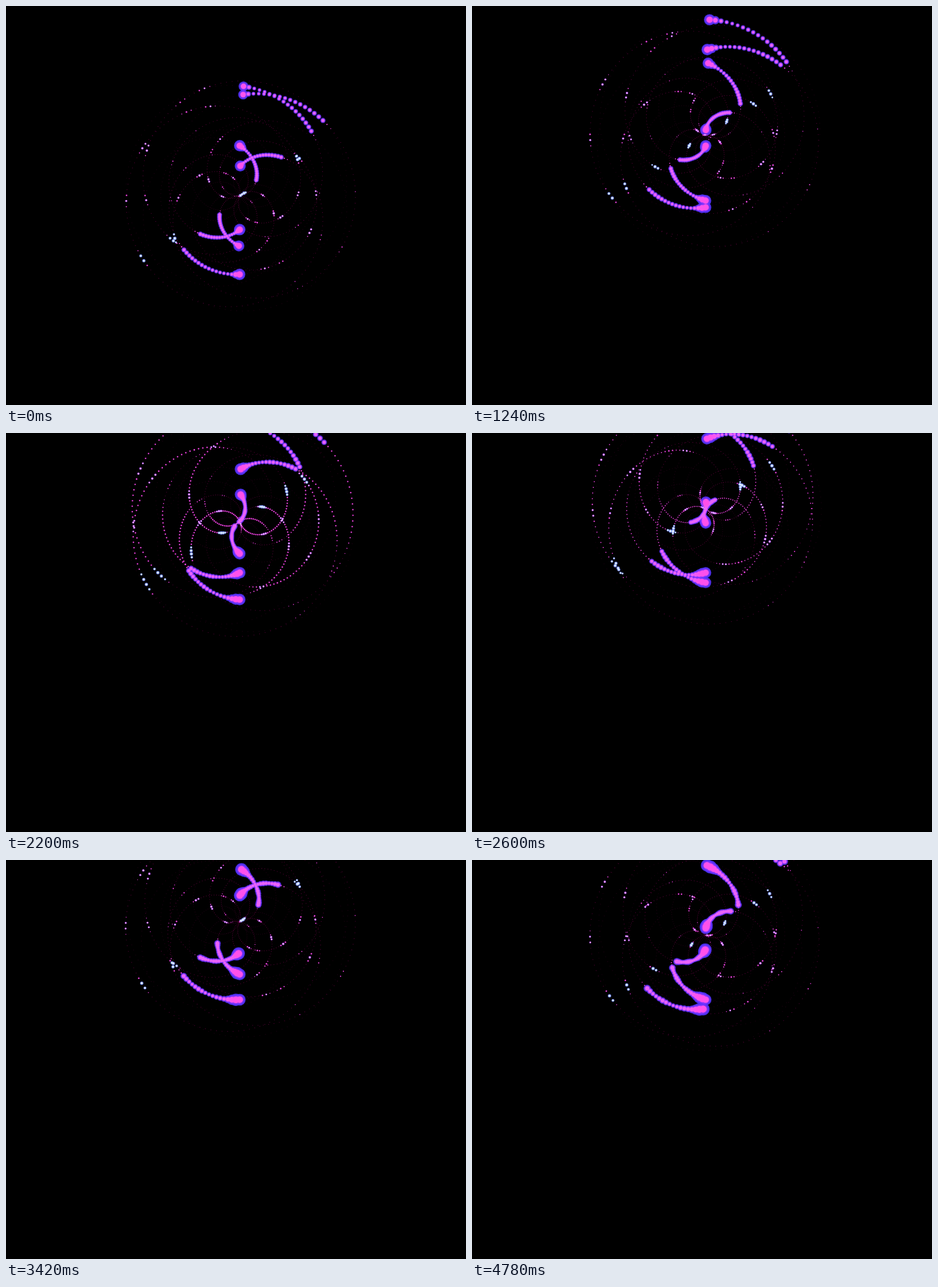
An HTML page with a canvas that plays this animation: 803x697 px, repeating every 4.8 s.

```html
<!DOCTYPE html>
<html lang="en">
<head>
<meta charset="utf-8">
<title>Rose of sparks</title>
<style>
  html, body { margin: 0; width: 100%; height: 100%; overflow: hidden; background: #000; }
  canvas { display: block; }
</style>
</head>
<body>
<canvas id="stage" width="803" height="697"></canvas>
<script>
const ctx = document.getElementById('stage').getContext('2d');
const TAU = Math.PI * 2;
const LOOP = 4800, TICK = 20;
const STEP = 0.05, DOTS = 1760;      // dots along 14 turns
const TURN_RATIO = 5 / 14;           // radius waves per turn
const BASE = 32, SWING = 170;        // radius = BASE - SWING * cos(phase)
const ANCHOR = { x: 408, y: 244 };   // the first dot never moves
const TRAIL_END = 48.5;

// Glints at fixed angles (degrees after each head): angle, radius
const GLINTS = [[87, 0.9], [117, 1.2], [147, 0.9], [237, 3.1], [268, 2],
                [297, 2.3], [328, 1.6], [341, 1.8]];

const bell = (x, width) => Math.exp(-((x / width) ** 2));
const clamp = x => Math.min(1, Math.max(0, x));

// Rims, bodies and cores are painted in turn, so that cores stay on top.
const layers = [[], [], []];
const put = (layer, ...shape) => layers[layer].push(shape);

function paintLayers() {
  for (const layer of layers) {
    for (const [x, y, r, color] of layer) {
      ctx.fillStyle = color;
      ctx.beginPath();
      ctx.arc(x, y, r, 0, TAU);
      ctx.fill();
    }
    layer.length = 0;
  }
}

function addTrailDot(x, y, w, t) {
  const late = t / LOOP;
  const head = bell(w - 3 * late, 4 + 5 * late);
  const ripple = 1 + 0.2 * late * (1 + Math.sin(w * 0.42 + t * 0.004));
  const r = (3 + 1.5 * w / 45) * ripple + 7 * head;
  put(0, x, y, r, `rgba(80,50,255,${0.75 + 0.17 * head})`);
  put(1, x, y, r * 0.8, `rgba(165,60,255,${0.75 - 0.35 * head})`);
  put(2, x, y, r * 0.56, `rgb(${232 + 23 * head},${100 - 20 * head},${250 - 15 * head})`);
}

function addSmallDot(x, y, w, t) {
  const glow = bell(t - 2250, 620);
  let r = 0;
  for (const [angle, size] of GLINTS) {
    r = Math.max(r, size * bell(w - angle, 4.4 + 3 * glow));
  }
  const band = w < 160 ? clamp((125 - w) / 30) : clamp((w - 222) / 12) * clamp((365 - w) / 20);
  const nearTrail = 1.4 * clamp(1 - (w - TRAIL_END) / 12);
  r = Math.max(r, nearTrail, 1.4 * glow * band);
  if (r < 0.75) {
    const fade = 0.65 - 0.4 * clamp((w - 370) / 60);
    put(0, x, y, 0.65, `rgba(140,0,90,${fade})`);
  } else if (r < 1.6) {
    put(0, x, y, r, 'rgba(215,35,205,0.85)');
    put(2, x, y, r * 0.5, '#ff80ee');
  } else {
    const icy = Math.abs(w - 237) < 5;
    put(0, x, y, r, icy ? 'rgba(120,135,255,0.8)' : 'rgba(165,65,245,0.85)');
    put(1, x, y, r * 0.7, icy ? '#b8dcff' : '#e890ff');
    put(2, x, y, r * 0.35, '#fff0ff');
  }
}

function draw(t) {
  ctx.fillStyle = '#000';
  ctx.fillRect(0, 0, 803, 697);
  const phase = 5.15e-4 * (t - 3700);
  const centerY = ANCHOR.y + BASE - SWING * Math.cos(phase);
  for (let i = DOTS - 1; i >= 0; i--) {
    const angle = i * STEP;
    const r = BASE - SWING * Math.cos(phase + TURN_RATIO * angle);
    const x = ANCHOR.x + r * Math.sin(angle);
    const y = centerY - r * Math.cos(angle);
    const w = (angle % (2 * TAU)) * 360 / TAU;
    (w < TRAIL_END ? addTrailDot : addSmallDot)(x, y, w, t);
  }
  paintLayers();
}

const start = performance.now();
function frame() {
  const t = (performance.now() - start) % LOOP;
  draw(Math.floor(t / TICK) * TICK);
  requestAnimationFrame(frame);
}
frame();
</script>
</body>
</html>
```
